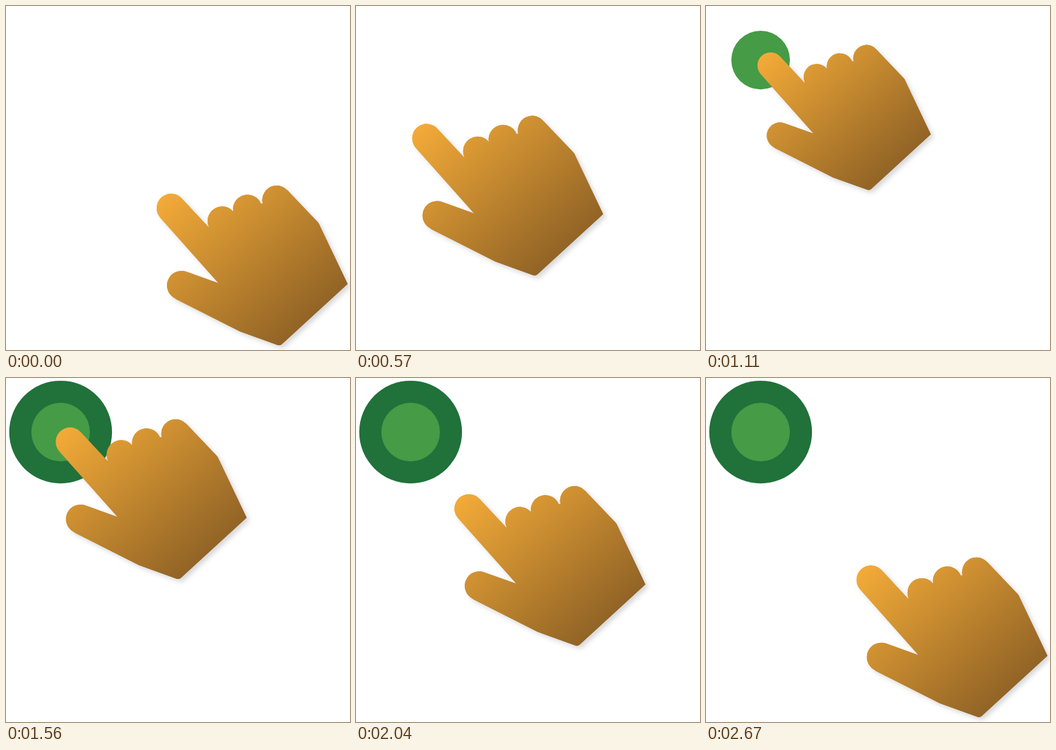
An HTML page with a canvas that plays this animation: 500 px wide and 500 px high, repeating every 2700 ms.

```html
<!DOCTYPE html>
<html>
<head>
<meta charset="utf-8">
<style>
  html, body { margin: 0; width: 100%; height: 100%; overflow: hidden; background: #fff; }
  canvas { display: block; width: 500px; height: 500px; }
</style>
</head>
<body>
<canvas id="stage" width="500" height="500"></canvas>
<script>
const ctx = document.getElementById('stage').getContext('2d');
const LOOP = 2700, STEP = 30;
const PIVOT = [357.5, 377];
const BUTTON = [79.4, 78.6];
// Approach curve, as offsets from the resting pose
const PATH = [[0, 0], [-117, 34], [-140, -81], [-157, -215]];

const ease = (t, from, to) => {
  const p = Math.min(1, Math.max(0, (t - from) / (to - from)));
  return p * p * (3 - 2 * p);
};

const bezier = (u, axis) => {
  const v = 1 - u;
  const [a, b, c, d] = PATH.map(p => p[axis]);
  return v * v * v * a + 3 * v * v * u * b + 3 * v * u * u * c + u * u * u * d;
};

function handShape() {
  const path = new Path2D();
  const knuckle = (x, y, from, to) => path.arc(x, y, 21, from, to);
  path.moveTo(309, 403);
  knuckle(240, 293.8, 2.42, 5.56);
  path.lineTo(294, 321);
  knuckle(314, 312.3, 2.72, 5.58);
  knuckle(351, 295.2, 3.0, 5.9);
  knuckle(393.5, 282, 2.9, 5.56);
  path.lineTo(453, 314);
  path.quadraticCurveTo(455, 316, 456, 319);
  path.lineTo(496.5, 404);
  path.lineTo(401, 491.5);
  path.quadraticCurveTo(398, 494, 394, 492.5);
  path.lineTo(340, 473);
  path.lineTo(246, 425.5);
  knuckle(255, 406, 2.02, 5.07);
  path.closePath();
  return path;
}

const hand = handShape();
const skin = ctx.createLinearGradient(228, 280, 409, 482);
skin.addColorStop(0, '#f2aa38');
skin.addColorStop(1, '#926426');

function disc(radius, color) {
  if (radius <= 0) return;
  ctx.fillStyle = color;
  ctx.beginPath();
  ctx.arc(...BUTTON, radius, 0, Math.PI * 2);
  ctx.fill();
}

function drawHand(t, shadowAlpha) {
  const reach = ease(t, 0, 900);
  const away = 1 - ease(t, 1350, 2700);
  const scale = 1 - 0.092 * (ease(t, 930, 1110) - ease(t, 1110, 1320));
  ctx.save();
  ctx.translate(PIVOT[0] + bezier(reach, 0) * away, PIVOT[1] + bezier(reach, 1) * away);
  ctx.scale(scale, scale);
  ctx.translate(-PIVOT[0], -PIVOT[1]);
  ctx.shadowColor = `rgba(0, 0, 0, ${shadowAlpha})`;
  ctx.shadowBlur = 7;
  ctx.shadowOffsetX = ctx.shadowOffsetY = 4;
  ctx.fillStyle = skin;
  ctx.fill(hand);
  ctx.restore();
}

function draw(t) {
  ctx.fillStyle = '#fff';
  ctx.fillRect(0, 0, 500, 500);
  // The shadow falls on the ground only, beneath the button
  drawHand(t, 0.16);
  disc(74.7 * ease(t, 1080, 1230), '#20713a');
  disc(42.6 * ease(t, 1020, 1110), '#459b46');
  drawHand(t, 0);
}

const start = performance.now();
function tick() {
  const t = (performance.now() - start) % LOOP;
  draw(Math.floor(t / STEP) * STEP);
  requestAnimationFrame(tick);
}
tick();
</script>
</body>
</html>
```
